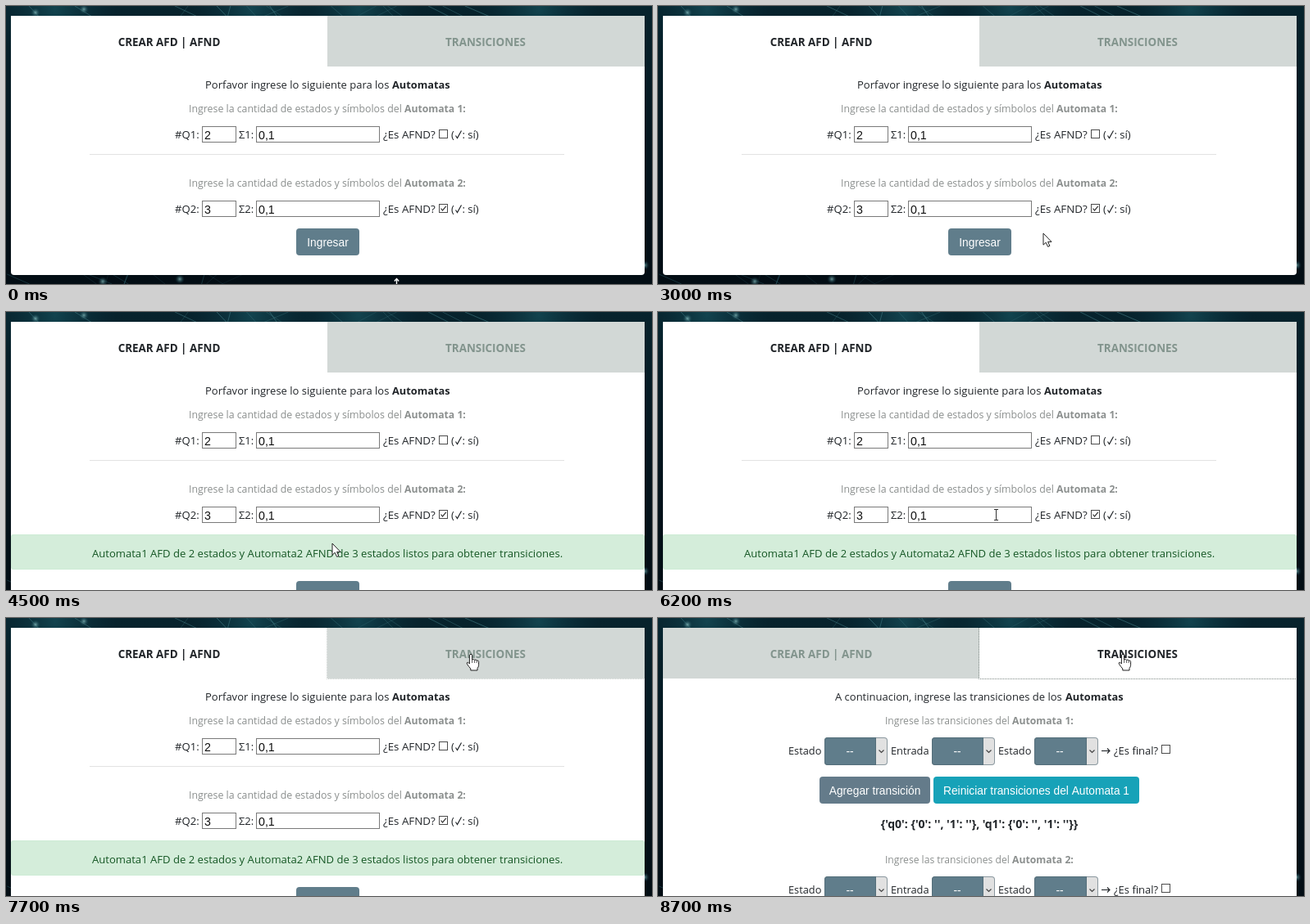
Recreate the animation shown at these times as an HTML page with a canvas. Size 788 by 340 pixels, loop 9.2 s.

```html
<!DOCTYPE html>
<html lang="es">
<head>
<meta charset="utf-8">
<title>Automatas</title>
<style>
  html, body { margin: 0; width: 100%; height: 100%; overflow: hidden; background: #04131b; }
  canvas { display: block; }
</style>
</head>
<body>
<canvas id="stage" width="788" height="340"></canvas>
<script>
const W = 788, H = 340, LOOP = 9200, STEP = 100;
const ctx = document.getElementById('stage').getContext('2d');

const SANS = '"Open Sans", "Noto Sans", sans-serif';
const ARIAL = '"Liberation Sans", Arial, sans-serif';
const INK = '#212529', MUTED = '#8b8f8e', SLATE = '#607d8b', SLATE_DARK = '#566e7c';
const TAB_OFF = '#d2d8d6', TAB_TEXT_OFF = '#82948d';

const HIDE_RESIZE = 200, SHOW_POINTER = 2500, SHOW_MESSAGE = 4500;
const FOCUS_TAB = 7700, SWITCH_TAB = 7800;

// Pointer hotspot: time, x, y
const TRAIL = [
  [2500, 600, 262], [3000, 470, 278], [3400, 357, 271], [3500, 356, 272],
  [3700, 356, 272], [3900, 386, 278], [4100, 386, 278], [4400, 398, 283],
  [6100, 398, 283], [6200, 412, 248], [6600, 476, 150], [7100, 557, 46], [7200, 567, 44]
];

const ARROW = new Path2D('M0 0V14.2L3.2 11.2L5.6 16.4L7.9 15.4L5.6 10.4H10Z');
const HAND = new Path2D('M-1.6 1.2Q0 -.8 1.6 1.2V7Q3.4 5.8 4.6 7.3Q6.3 6.4 7.2 8' +
  'Q9.2 7.4 9.6 9.4V13.5Q9.4 16 8 17.6V20H-.2V18Q-2.6 15.4-4.6 12.2Q-5.4 10.2-3.4 10.2L-1.6 12Z');

function text(str, x, y, size, color = INK, { bold = false, family = SANS, align = 'left' } = {}) {
  ctx.font = `${bold ? 'bold ' : ''}${size}px ${family}`;
  ctx.fillStyle = color;
  ctx.textAlign = align;
  ctx.fillText(str, x, y);
}

function rect(x, y, w, h, color) {
  ctx.fillStyle = color;
  ctx.fillRect(x, y, w, h);
}

function rounded(x, y, w, h, radius, color) {
  ctx.fillStyle = color;
  ctx.beginPath();
  ctx.roundRect(x, y, w, h, radius);
  ctx.fill();
}

function outline(x, y, w, h, color) {
  ctx.strokeStyle = color;
  ctx.lineWidth = 1;
  ctx.strokeRect(x + .5, y + .5, w - 1, h - 1);
}

function line(points, color, width = 1) {
  ctx.strokeStyle = color;
  ctx.lineWidth = width;
  ctx.beginPath();
  points.forEach(([x, y]) => ctx.lineTo(x, y));
  ctx.stroke();
}

function seeded(seed) {
  return () => (seed = (seed * 16807) % 2147483647) / 2147483647;
}

function glow(x, y, r, color) {
  const g = ctx.createRadialGradient(x, y, 0, x, y, r);
  g.addColorStop(0, color);
  g.addColorStop(1, 'rgba(10,60,75,0)');
  rect(x - r, y - r, r * 2, r * 2, g);
}

function backdrop() {
  const random = seeded(4711);
  const base = ctx.createLinearGradient(0, 0, 0, H);
  base.addColorStop(0, '#07232d');
  base.addColorStop(.5, '#05161f');
  base.addColorStop(1, '#030d14');
  rect(0, 0, W, H, base);
  [60, 300, 430, 650].forEach(x => glow(x, 4, 75, 'rgba(30,100,112,.5)'));
  for (let i = 0; i < 18; i++) {
    const x = random() * 760, lean = random() * 70 - 35;
    line([[x, 0], [x + lean, 13]], `rgba(95,165,172,${.12 + random() * .3})`);
  }
  for (let i = 0; i < 12; i++) {
    const x = random() * 300, lean = random() * 60 - 30;
    line([[x, H - 12], [x + lean, H]], `rgba(60,125,138,${.1 + random() * .25})`);
  }
  [[36, 8], [95, 4], [118, 337], [212, 334], [779, 317]].forEach(([x, y]) => {
    glow(x, y, 6, 'rgba(150,205,205,.7)');
  });
}

function button(label, x, y, w, color) {
  rounded(x, y, w, 33, 4, color);
  text(label, x + w / 2, y + 21.5, 13.75, '#fff', { family: ARIAL, align: 'center' });
}

function checkbox(x, y, checked) {
  rect(x, y, 11, 11, '#fff');
  outline(x, y, 11, 11, '#4c4c4c');
  if (checked) line([[x + 2.5, y + 5.5], [x + 4.5, y + 8], [x + 8.8, y + 2.8]], '#333', 1.2);
}

function input(value, x, y, w) {
  outline(x, y, w, 20, '#7a7a7a');
  text(value, x + 3, y + 15.5, 14.2, '#111', { family: ARIAL });
}

function heading(lead, x, boldX) {
  text(lead, x, 101, 13);
  text('Automatas', boldX, 101, 12.8, INK, { bold: true });
}

function hint(lead, n, x, boldX, y, size) {
  text(lead, x, y, size, MUTED);
  text(`Automata ${n}:`, boldX, y, 12.2, MUTED, { bold: true });
}

function tabs(second, focused) {
  rect(second ? 6 : 392, 12, second ? 386 : 387, 62, TAB_OFF);
  const label = (str, x, on) =>
    text(str, x, 49, 13.4, on ? INK : TAB_TEXT_OFF, { bold: true, align: 'center' });
  label('CREAR AFD | AFND', 199, !second);
  label('TRANSICIONES', 585, second);
  if (focused) {
    ctx.setLineDash([1, 1]);
    line([[391.5, 12], [391.5, 74.5], [779, 74.5]], second ? '#7f8a86' : '#c4cbc8');
    ctx.setLineDash([]);
  }
}

function automatonRow(n, states, checked, y) {
  hint('Ingrese la cantidad de estados y símbolos del ', n, 223, 486, y - 27, 12.35);
  text(`#Q${n}:`, 206, y + 5, 13.1);
  input(states, 239, y - 10, 42);
  text(`Σ${n}:`, 284, y + 5, 13);
  input('0,1', 305, y - 10, 151);
  text('¿Es AFND?', 460, y + 5, 13.3);
  checkbox(528, y - 6, checked);
  text('(', 543, y + 5, 13);
  line([[548.5, y + 1.5], [550.5, y + 4.5], [555.5, y - 4.5]], INK, 1.2);
  text(': sí)', 556.5, y + 5, 13);
}

function createPage(t, pointer) {
  const done = t >= SHOW_MESSAGE;
  heading('Porfavor ingrese lo siguiente para los ', 243, 471);
  automatonRow(1, '2', false, 157);
  rect(102, 181, 579, 1, '#e2e2e2');
  automatonRow(2, '3', true, 248);
  if (done) {
    rounded(6, 272, 773, 43, 3, '#cdebd5');
    rounded(7, 273, 771, 41, 3, '#d4edda');
    text('Automata1 AFD de 2 estados y Automata2 AFND de 3 estados listos para obtener transiciones.',
      105, 300, 13.08, '#155724');
  }
  const y = done ? 329 : 272;
  const hover = pointer && pointer.x >= 354 && pointer.x < 431 && pointer.y >= y - 1 && pointer.y < y + 33;
  button('Ingresar', 354, y, 77, hover ? SLATE_DARK : SLATE);
}

function select(x, y, w) {
  rounded(x, y, w, 34, 4, '#8b989f');
  rounded(x + 1, y + 1, w - 2, 32, 3, '#e1e1e1');
  rounded(x, y, w - 14, 34, [4, 0, 0, 4], '#546e7a');
  rounded(x + 1, y + 1, w - 16, 32, [3, 0, 0, 3], SLATE);
  text('--', x + 31, y + 22, 13.75, '#fff', { family: ARIAL, align: 'center' });
  const cx = x + w - 7.5;
  line([[cx - 3, y + 15.5], [cx, y + 18.5], [cx + 3, y + 15.5]], '#444', 1.2);
}

function transitionRow(n, y) {
  hint('Ingrese las transiciones del ', n, 277, 432, y - 16, 12.1);
  text('Estado', 159, y + 21, 12.8);
  select(203, y, 77);
  text('Entrada', 284, y + 21, 12.8);
  select(334, y, 77);
  text('Estado', 415, y + 21, 12.8);
  select(459, y, 78);
  line([[541, y + 16.5], [551, y + 16.5]], INK, 1.1);
  line([[548, y + 13.5], [551, y + 16.5], [548, y + 19.5]], INK, 1.1);
  text('¿Es final?', 556, y + 21, 13);
  checkbox(614, y + 9, false);
}

function transitionsPage() {
  heading('A continuacion, ingrese las transiciones de los ', 216, 497);
  transitionRow(1, 146);
  button('Agregar transición', 197, 194, 135, '#647b8a');
  button('Reiniciar transiciones del Automata 1', 336, 194, 251, '#17a2b8');
  text("{'q0': {'0': '', '1': ''}, 'q1': {'0': '', '1': ''}}", 392, 257, 14, INK,
    { bold: true, align: 'center' });
  transitionRow(2, 316);
}

function pointerAt(t) {
  if (t < SHOW_POINTER) return null;
  const next = TRAIL.findIndex(p => p[0] > t);
  if (next < 0) {
    const [, x, y] = TRAIL[TRAIL.length - 1];
    return { x, y };
  }
  const [t0, x0, y0] = TRAIL[next - 1], [t1, x1, y1] = TRAIL[next];
  const k = (t - t0) / (t1 - t0);
  return { x: Math.round(x0 + (x1 - x0) * k), y: Math.round(y0 + (y1 - y0) * k) };
}

function drawPointer({ x, y }) {
  const inInput = x > 305 && x < 456 && ((y >= 238 && y < 258) || (y >= 147 && y < 167));
  ctx.save();
  ctx.translate(x, y);
  if (inInput) {
    ctx.translate(.5, 0);
    line([[-2.5, -6.5], [2.5, -6.5]], '#333');
    line([[-2.5, 6.5], [2.5, 6.5]], '#333');
    line([[0, -6], [0, 6]], '#333');
  } else {
    const hand = y < 74, shape = hand ? HAND : ARROW;
    ctx.fillStyle = '#fff';
    ctx.strokeStyle = '#222';
    ctx.lineWidth = 1;
    ctx.lineJoin = 'round';
    ctx.fill(shape);
    ctx.stroke(shape);
    if (hand) {
      [1.6, 4.6, 7.2].forEach((fx, i) => line([[fx, 7 + i * .5], [fx, 11]], '#333', .8));
    }
  }
  ctx.restore();
}

function resizePointer() {
  line([[476.5, 334], [476.5, 340]], '#fff', 1.4);
  line([[473.8, 336.5], [476.5, 333.5], [479.2, 336.5]], '#fff', 1.4);
}

function draw(t) {
  const second = t >= SWITCH_TAB, pointer = pointerAt(t);
  backdrop();
  rounded(6, 12, 773, t < SHOW_MESSAGE ? 317 : 340, [0, 0, 4, 4], '#fff');
  tabs(second, t >= FOCUS_TAB);
  if (second) transitionsPage();
  else createPage(t, pointer);
  if (t < HIDE_RESIZE) resizePointer();
  if (pointer) drawPointer(pointer);
}

const start = performance.now();
function frame() {
  const t = (performance.now() - start) % LOOP;
  draw(Math.floor(t / STEP) * STEP);
  requestAnimationFrame(frame);
}
frame();
</script>
</body>
</html>
```
